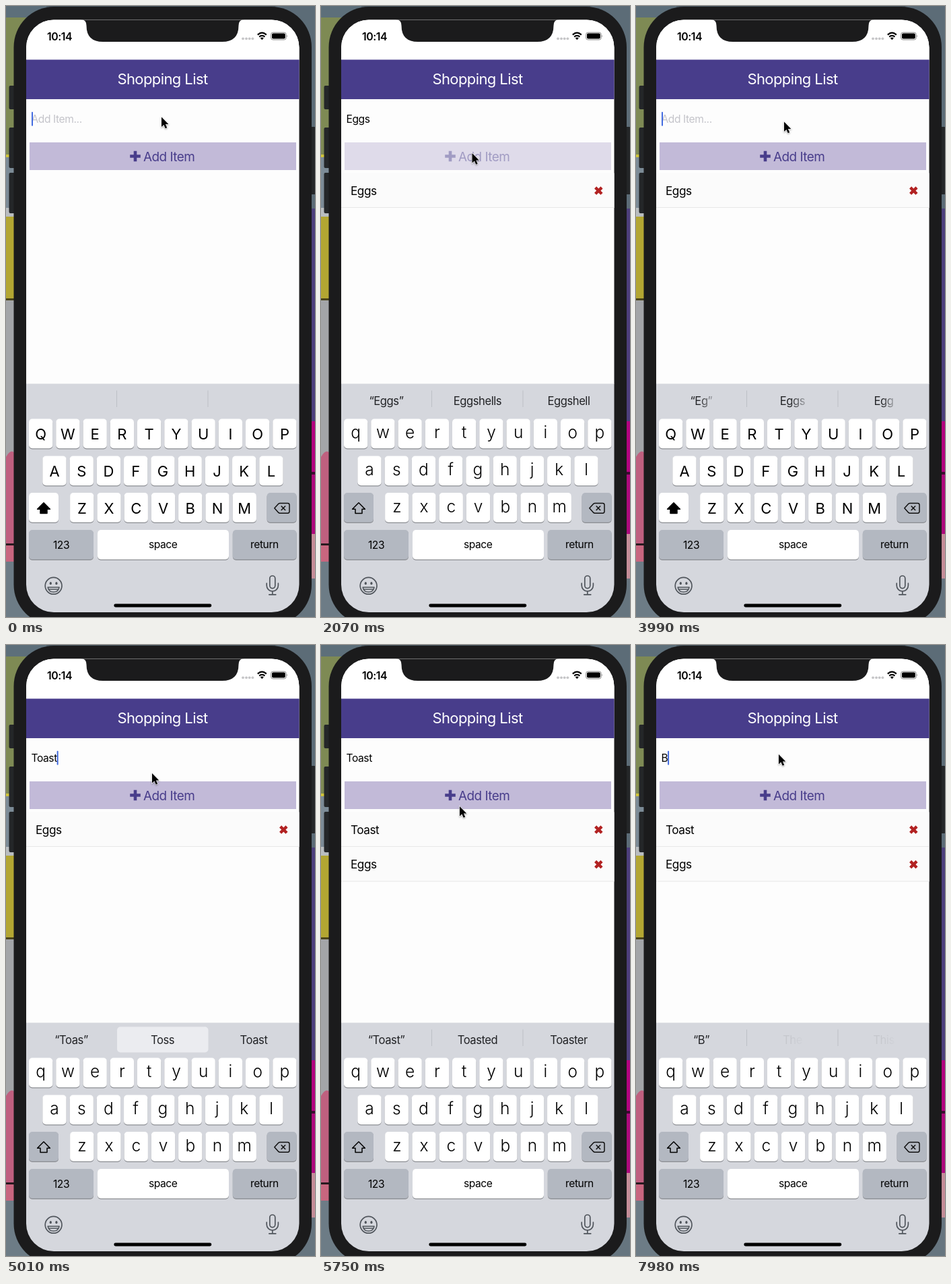
Write an HTML page that moves like this. It is 459 px wide and 905 px high and loops after 8000 ms.

```html
<!DOCTYPE html>
<html lang="en">
<head>
<meta charset="utf-8">
<title>Shopping List</title>
<style>
  html, body { margin: 0; width: 100%; height: 100%; overflow: hidden; background: #5f6f79; }
  svg { display: block; width: 100%; height: 100%; }
  text { font-family: Inter, Roboto, "Liberation Sans", sans-serif; font-optical-sizing: none; letter-spacing: -.027em; white-space: pre; }
  .mid { text-anchor: middle; }
  .item { font-size: 17.2px; }
  .input { font-size: 15.6px; }
  .hint { font-size: 16.6px; fill: #222326; }
  .upper { font-size: 22px; letter-spacing: 0; }
  .lower { font-size: 24.5px; font-weight: 300; letter-spacing: 0; }
  .line { fill: none; stroke: #50555c; stroke-width: 1.7; stroke-linecap: round; stroke-linejoin: round; }
</style>
</head>
<body>
<svg id="stage" viewBox="0 0 459 905"></svg>
<script>
const LOOP = 8000, TICK = 147.4;
const GREY = '#b3b8c1';

const rect = (x, y, w, h, fill, r = 0, more = '') =>
  `<rect x="${x}" y="${y}" width="${w}" height="${h}" rx="${r}" fill="${fill}" ${more}/>`;
const path = (d, more) => `<path d="${d}" ${more}/>`;
const text = (x, y, s, cls, more = '') => `<text x="${x}" y="${y}" class="${cls}" ${more}>${s}</text>`;
const key = (x, y, w, fill = '#fff') => rect(x, y + 1, w, 44, '#8b8d92', 5) + rect(x, y, w, 43.8, fill, 5);

function wallpaper() {
  const left = [[0, 17, '#5d6f7a'], [17, 203, '#7e8a54'], [220, 4, '#d0c43a'], [224, 75, '#7c8b96'], [299, 13, '#b9bdc0'],
    [312, 121, '#b3a632'], [433, 3, '#4c451c'], [436, 220, '#a3a5a8'], [656, 140, '#bf607f'], [796, 3, '#2a1a20'],
    [799, 24, '#c8667f'], [823, 82, '#6d7c86']];
  const right = [[0, 300, '#5c6c77'], [300, 315, '#4d3f7c'], [615, 75, '#b2047f'], [690, 4, '#3d0a30'],
    [694, 88, '#ac0a7c'], [782, 66, '#c48d98'], [848, 57, '#66757f']];
  return left.map(([y, h, c]) => rect(0, y, 60, h, c)).join('') +
    right.map(([y, h, c]) => rect(400, y, 59, h, c)).join('') +
    rect(60, 0, 340, 8, '#4d5c66') +
    path('M0 668Q8 654 14 664V640H0Z', 'fill="#a3a5a8"');
}

function phone() {
  const side = (x, y, h) => rect(x, y, 10, h, '#242628', 2);
  return side(4.5, 118, 35) + side(4.5, 180, 60) + side(4.5, 247, 60) + side(450, 179, 100) +
    rect(11.5, 1, 442.5, 916, '#1b1b1c', 60);
}

function statusBar() {
  const dots = [352, 357, 361.7, 366.4].map(x => `<circle cx="${x}" cy="48.3" r="1.9" fill="#c6c6c8"/>`).join('');
  return path('M111 20Q119.5 20 119.5 29Q119.5 53 144 53H321Q345.5 53 345.5 29Q345.5 20 354 20Z', 'fill="#1b1b1c"') +
    text(61, 50.5, '10:14', '', 'font-size="15.8" font-weight="600"') + dots +
    path('M373.8 42.6Q380.3 36.8 386.8 42.6M376.2 45.6Q380.3 42 384.4 45.6', 'fill="none" stroke="#000" stroke-width="2.2"') +
    path('M377.8 47.6Q380.3 45.6 382.8 47.6L380.3 50.2Z', '') +
    rect(393.6, 39.2, 22.6, 10.8, 'none', 3, 'stroke="#8a8a8a"') + rect(395, 40.6, 19.8, 8, '#000', 1.8) +
    path('M417.3 42.8q1.8 1.8 0 3.6Z', 'fill="#8a8a8a"');
}

function row(id, y, name) {
  return `<g id="${id}">` + rect(30, y, 406, 51, '#fbfbfb') + rect(30, y + 50.5, 406, 1, '#e8e8e8') +
    text(44, y + 32, name, 'item') +
    path(`M407.6 ${y + 21.4}l9.4 9.4m0 -9.4l-9.4 9.4`, 'stroke="#b22222" stroke-width="4.4"') + '</g>';
}

function app() {
  return rect(30, 20, 406, 540, '#fdfdfd') + rect(30, 20, 406, 60, '#fff') +
    rect(30, 79.5, 406, 58.5, '#483d8b') +
    text(232.5, 116, 'Shopping List', 'mid', 'font-size="22" fill="#fff"') +
    text(37.5, 173, '', 'input', 'id="input"') + rect(38, 156.8, 2, 21, '#426be0', 1, 'id="caret"') +
    '<g id="button">' + rect(35, 202, 396, 41, '#c2bad8') +
    path('M192 214.7v15.6M184.2 222.5h15.6', 'stroke="#483d8b" stroke-width="4.6"') +
    text(204, 229.8, 'Add Item', '', 'font-size="18.9" fill="#483d8b"') + '</g>' +
    row('first', 247.5, '') + row('second', 299, 'Eggs');
}

function letters(cls, up) {
  const rows = [['qwertyuiop', 51.7, 642], ['asdfghjkl', 72, 697], ['zxcvbnm', 112.8, 752]];
  const glyphs = rows.map(([s, x, y]) => [...s].map((c, i) =>
    text(x + i * 40.25, up ? y : y - 2, up ? c.toUpperCase() : c, 'mid ' + cls)).join('')).join('');
  const arrow = path('M56 735.8L65.4 745.2H61V751.6H51V745.2H46.6Z',
    `fill="${up ? '#000' : 'none'}" stroke="#000" stroke-width="1.5" stroke-linejoin="round"`);
  return `<g id="${cls}">` + key(34, 721, 44, up ? '#fff' : GREY) + arrow + glyphs + '</g>';
}

function keyboard() {
  let s = rect(30, 559.5, 406, 346, '#d5d7dd');
  s += '<g id="bars">' + rect(164, 569.5, 1, 24.5, '#bdc0c6') + rect(299.5, 569.5, 1, 24.5, '#bdc0c6') + '</g>';
  s += rect(165, 565.5, 135.5, 38, '#ebecf0', 5, 'id="pick"');
  s += [97, 232.5, 368].map((x, i) => text(x, 590.6, '', 'mid hint', `id="hint${i}"`)).join('');
  [[10, 34, 611.5], [9, 54.3, 666.5], [7, 95.1, 721]].forEach(([n, x, y]) => {
    for (let i = 0; i < n; i++) s += key(x + i * 40.25, y, 35.3);
  });
  s += key(387.6, 721, 44, GREY) + key(34, 776, 96, GREY) + key(136, 776, 195, '#fff') + key(336.8, 776, 94.8, GREY);
  s += letters('upper', true) + letters('lower', false);
  s += path('M398.8 743.8L404.8 737.2Q405.6 736.4 407 736.4H418.5Q421 736.4 421 739V748.6Q421 751.2 418.5 751.2H407Q405.6 751.2 404.8 750.4ZM408.7 740.5l6.4 6.6m0 -6.6l-6.4 6.6',
    'fill="none" stroke="#111" stroke-width="1.5" stroke-linejoin="round"');
  s += text(82, 803.6, '123', 'mid input') + text(233.2, 802.6, 'space', 'mid input') + text(384, 802.6, 'return', 'mid input');
  s += '<g class="line"><circle cx="70.6" cy="858.8" r="12.4"/>' +
    path('M62.2 861H79Q78 868 70.6 868Q63.2 868 62.2 861ZM63.6 864H77.6', '') +
    '<rect x="391.8" y="844" width="8" height="18.6" rx="4"/>' +
    path('M387.2 855v3.2a8.6 8.6 0 0 0 17.2 0V855M395.8 867v4.6M390.8 871.8h10', '') + '</g>' +
    '<g fill="#50555c"><ellipse cx="66.3" cy="855.2" rx="1.6" ry="2.1"/><ellipse cx="74.9" cy="855.2" rx="1.6" ry="2.1"/></g>';
  return s + rect(160.3, 885.6, 145, 4.8, '#000', 2.4);
}

const stage = document.getElementById('stage');
stage.innerHTML = `<defs>
  <clipPath id="screen"><rect x="30" y="20.5" width="405.5" height="877.5" rx="41"/></clipPath>
  <linearGradient id="wipe"><stop offset=".4" stop-color="#222326"/><stop offset="1" stop-color="#222326" stop-opacity=".3"/></linearGradient>
  </defs>` + wallpaper() + phone() +
  `<g clip-path="url(#screen)">${app()}${keyboard()}${statusBar()}</g>` +
  path('M0 0V14.6L3.4 11.5L5.7 16.8L8.2 15.7L5.9 10.5H10.3Z',
    'id="pointer" stroke="#fff" stroke-width="1.2" paint-order="stroke" style="filter:drop-shadow(0 1px 1px rgba(0,0,0,.35))"');

const $ = id => document.getElementById(id);
const show = (id, on) => $(id).style.display = on ? '' : 'none';

// Tracks: [tick, value], each value holds until the next entry.
const typed = [[0, ''], [5, 'E'], [6, 'Eg'], [8, 'Egg'], [9, 'Eggs'], [23, 'Egg'], [25, 'Eg'], [26, 'E'], [27, ''],
  [29, 'T'], [30, 'To'], [31, 'Toa'], [32, 'Toas'], [33, 'Toast'], [47, 'Toas'], [48, 'Toa'], [49, 'T'], [50, ''], [53, 'B']];
const hinted = [[0, ''], [6, 'E'], [7, 'Eg'], [9, 'Egg'], [12, 'Eggs'], [25, 'Egg'], [26, 'Eg'], [28, ''],
  [30, 'T'], [31, 'To'], [32, 'Toa'], [33, 'Toas'], [36, 'Toast'], [48, 'Toas'], [49, 'Toa'], [50, 'T'], [52, ''], [53, 'B']];
const caret = [[0, 1], [1, .5], [2, 0], [4, 1], [13, 0], [21, 1], [36, 0], [42, 1], [44, .5], [45, 0], [47, 1]];
const press = [[0, 1], [12, .7], [13, .25], [14, .5], [15, .8], [16, 1], [35, .7], [36, .25], [37, .5], [38, .8], [39, 1]];
const route = [[0, 231, 164.5], [7, 231, 164.5], [9, 225, 213], [10, 224.5, 218], [17, 224.5, 218], [20, 220, 171.5],
  [32, 220, 171.5], [34, 217, 190], [36, 206, 239], [40, 206, 239], [42, 212, 162], [99, 212, 162]];
const words = {
  E: ['Even', 'Every'], Eg: ['Eggs', 'Egg'], Egg: ['Eggs', 'Eggplant'], Eggs: ['Eggshells', 'Eggshell'],
  T: ['The', 'This'], To: ['Too', 'Today'], Toa: ['Toast', 'Toad'], Toas: ['Toss', 'Toast'],
  Toast: ['Toasted', 'Toaster'], B: ['The', 'This']
};

const at = (track, n) => track.filter(e => e[0] <= n).pop()[1];

function along(n) {
  const i = route.findIndex(p => p[0] > n), [a, x, y] = route[i - 1], [b, u, v] = route[i];
  const k = (n - a) / (b - a);
  return [x + (u - x) * k, y + (v - y) * k];
}

function draw(n) {
  const value = at(typed, n), hint = at(hinted, n);
  const input = $('input');
  input.textContent = value || 'Add Item...';
  input.setAttribute('fill', value ? '#000' : '#c4c4ca');
  $('caret').setAttribute('x', value ? 37.3 + input.getComputedTextLength() : 38);
  $('caret').style.opacity = at(caret, n);
  $('button').style.opacity = at(press, n);

  show('upper', !value);
  show('lower', value);
  show('first', n >= 14);
  show('second', n >= 37);
  $('first').querySelector('text').textContent = n >= 37 ? 'Toast' : 'Eggs';

  show('pick', hint === 'Toas');
  show('bars', hint !== 'Toas');
  const fading = hint && !value;
  const shown = hint ? [`“${hint}”`, ...words[hint]] : ['', '', ''];
  shown.forEach((s, i) => {
    const el = $('hint' + i), ghost = hint === 'B' && i > 0;
    el.textContent = s;
    el.style.fill = fading || ghost ? 'url(#wipe)' : '';
    el.style.opacity = ghost ? (n > 53 ? .08 : .3) : n === 51 ? .4 : 1;
  });

  $('pointer').setAttribute('transform', `translate(${along(n)})`);
}

let last = -1;
const start = performance.now();
function frame() {
  const t = (performance.now() - start) % LOOP;
  const n = Math.floor((t + 5) / TICK);
  if (n !== last) draw(last = n);
  requestAnimationFrame(frame);
}
frame();
</script>
</body>
</html>
```
